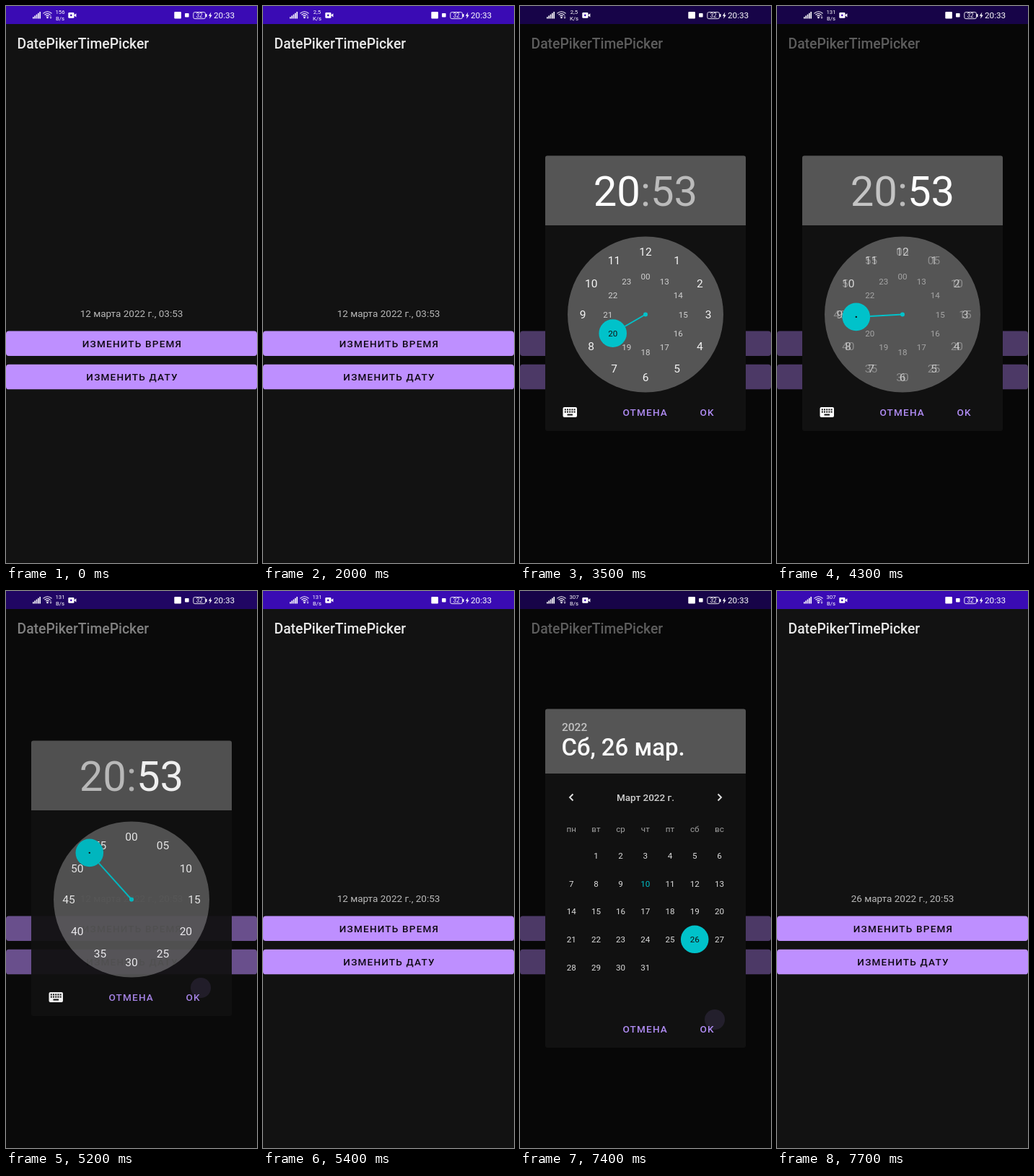
Recreate the animation shown at these times as an HTML page. Size 348 by 772 pixels, loop 8800 ms.

```html
<!DOCTYPE html>
<html lang="ru">
<head>
<meta charset="utf-8">
<style>
html, body { margin: 0; width: 100%; height: 100%; overflow: hidden; background: #121212; }
svg { display: block; width: 100%; height: 100%; font-family: Roboto, "Noto Sans", sans-serif; }
.mid { text-anchor: middle; }
.btn { font-size: 13.53px; font-weight: 500; letter-spacing: .0893em; }
</style>
</head>
<body>
<svg id="stage" viewBox="0 0 348 772"></svg>
<script>
const LOOP = 8800, STEP = 100;
const TEAL = '#00c2ca', PURPLE = '#be8fff', ACTION = '#b08cf4';
const HEADER = '#555', BODY = '#111';
const DIAL = { x: 174, y: 427.5, outer: 87, inner: 52.3, knob: 19.3 };
const stage = document.getElementById('stage');

function add(parent, tag, attrs, content) {
  const el = document.createElementNS('http://www.w3.org/2000/svg', tag);
  for (const key in attrs) el.setAttribute(key, attrs[key]);
  if (content !== undefined) el.textContent = content;
  parent.appendChild(el);
  return el;
}
const set = (el, attrs) => { for (const key in attrs) el.setAttribute(key, attrs[key]); };
const group = (parent, attrs) => add(parent, 'g', attrs);
const rect = (parent, x, y, width, height, fill, rx = 0) =>
  add(parent, 'rect', { x, y, width, height, fill, rx });
const circle = (parent, cx, cy, r, fill) => add(parent, 'circle', { cx, cy, r, fill });
const path = (parent, d, attrs) => add(parent, 'path', { d, fill: 'none', ...attrs });
const text = (parent, x, y, size, fill, content, attrs) =>
  add(parent, 'text', { x, y, 'font-size': size, fill, ...attrs }, content);
const centered = (parent, x, y, size, fill, content, attrs) =>
  text(parent, x, y + size * .355, size, fill, content, { class: 'mid', ...attrs });

const clamp = v => Math.min(1, Math.max(0, v));
const fade = (t, start, end) => t < end ? clamp((t - start) / 200) : 1 - clamp((t - end) / 200);
const decelerate = p => 1 - (1 - p) ** 2;
const smooth = p => (1 - Math.cos(Math.PI * p)) / 2;
const polar = (degrees, r) => {
  const a = degrees * Math.PI / 180;
  return [DIAL.x + r * Math.sin(a), DIAL.y - r * Math.cos(a)];
};
const pad = n => String(n).padStart(2, '0');

// Main screen
rect(stage, 0, 0, 348, 772, '#121212');
rect(stage, 0, 0, 348, 25, '#3a0bb4');
text(stage, 15.5, 59.3, 19.33, '#e9e9e9', 'DatePikerTimePicker', { 'font-weight': 500 });
const dateLine = text(stage, 174, 431.2, 13.53, '#b8b8b8', '', { class: 'mid' });

function wideButton(y, label) {
  rect(stage, 0, y, 348, 34.5, PURPLE, 3.9);
  const press = rect(stage, 0, y, 348, 34.5, '#000', 3.9);
  text(stage, 175, y + 22.6, 13.53, '#0d0812', label, { class: 'btn mid' });
  return press;
}
const timePress = wideButton(450.5, 'ИЗМЕНИТЬ ВРЕМЯ');
const datePress = wideButton(496.8, 'ИЗМЕНИТЬ ДАТУ');
const shade = rect(stage, 0, 0, 348, 772, '#000');

// Dialog frame shared by both pickers
function dialog(top, split, bottom) {
  const g = group(stage);
  rect(g, 35, top, 278, bottom - top, BODY, 3);
  path(g, `M35 ${split}V${top + 3}q0-3 3-3H310q3 0 3 3V${split}z`, { fill: HEADER });
  const press = circle(g, 270, bottom - 39, 14, ACTION);
  text(g, 142.6, bottom - 21.2, 13.53, ACTION, 'ОТМЕНА', { class: 'btn' });
  text(g, 249.5, bottom - 21.2, 13.53, ACTION, 'OK', { class: 'btn' });
  return { g, press };
}

// Time picker
const timeDialog = dialog(207.5, 304, 589);
const clock = text(timeDialog.g, 174, 276.7, 58, '#bbb', undefined, { class: 'mid' });
const hourText = add(clock, 'tspan', {});
add(clock, 'tspan', {}, ':');
const minuteText = add(clock, 'tspan', {}, '53');

circle(timeDialog.g, DIAL.x, DIAL.y, 108, HEADER);
const hours = group(timeDialog.g), minutes = group(timeDialog.g);
for (let i = 0; i < 12; i++) {
  const [x, y] = polar(i * 30, DIAL.outer);
  const [ix, iy] = polar(i * 30, DIAL.inner);
  centered(hours, x, y, 15.5, '#f4f4f4', i || 12);
  centered(hours, ix, iy, 11.6, '#d0d0d0', i ? i + 12 : '00');
  centered(minutes, x, y, 15.5, '#f4f4f4', pad(i * 5));
}
const hand = add(timeDialog.g, 'line', { x1: DIAL.x, y1: DIAL.y, stroke: TEAL, 'stroke-width': 2 });
circle(timeDialog.g, DIAL.x, DIAL.y, 3, TEAL);
const knob = circle(timeDialog.g, 0, 0, DIAL.knob, TEAL);
const knobDot = circle(timeDialog.g, 0, 0, 1.2, BODY);
const knobLabel = centered(timeDialog.g, 0, 0, 15.5, BODY, '');

rect(timeDialog.g, 59.5, 556, 19.5, 14, '#fff', 2);
for (let i = 0; i < 10; i++)
  rect(timeDialog.g, 61.8 + i % 5 * 3.2, 558.4 + Math.floor(i / 5) * 3.2, 2, 2, BODY);
rect(timeDialog.g, 65.5, 565.5, 7.5, 2, BODY);

// Date picker
const dateDialog = dialog(163.5, 253, 633);
const cal = dateDialog.g;
text(cal, 58, 193.5, 15.5, '#c2c2c2', '2022', { 'font-weight': 500 });
const dateTitle = text(cal, 57.5, 228.3, 32.9, '#fafafa', '', { 'font-weight': 500 });
centered(cal, 174, 286, 13.53, '#d0d0d0', 'Март 2022 г.', { 'font-weight': 500 });
for (const d of ['M73.5 281.5l-4.5 4.5 4.5 4.5', 'M274.5 281.5l4.5 4.5-4.5 4.5'])
  path(cal, d, { stroke: '#e0e0e0', 'stroke-width': 1.9 });
const columnX = c => 71.2 + c * 34.2;
const cell = day => [columnX(day % 7), 367 + Math.floor(day / 7) * 38.6];
['пн', 'вт', 'ср', 'чт', 'пт', 'сб', 'вс'].forEach((name, c) =>
  centered(cal, columnX(c), 330, 11.6, '#a0a0a0', name));
const dayMark = circle(cal, 0, 0, DIAL.knob, TEAL);
const days = [];
for (let day = 1; day <= 31; day++)
  days[day] = centered(cal, ...cell(day), 11.6, '#dcdcdc', day);

// Status icons stay above the shade
const status = group(stage, { fill: '#fff' });
for (let i = 0; i < 5; i++) rect(status, 37 + i * 2.35, 15.2 - i * 1.8, 1.6, 2.3 + i * 1.8, '#fff');
for (const r of [7.5, 5, 2.6])
  path(status, `M${57.5 - r * .8} ${16 - r * .75}Q57.5 ${16 - r * 1.45} ${57.5 + r * .8} ${16 - r * .75}`,
    { stroke: '#fff', 'stroke-width': 1.2 });
circle(status, 57.5, 16, 1.3, '#fff');
path(status, 'M62 13v4m-1.3-1.3l1.3 1.5 1.3-1.5', { stroke: '#fff', 'stroke-width': .7 });
const speed = text(status, 75, 11.3, 7.8, '#fff', '', { class: 'mid' });
const unit = text(status, 75, 19.8, 7.8, '#fff', '', { class: 'mid' });
rect(status, 86.3, 9, 8.2, 7.8, '#fff', 1.4);
path(status, 'M94 12.8l3.4-2.6v5.4z', { fill: '#fff' });
circle(status, 90.3, 12.9, 1.3, '#3a0bb4');
rect(status, 233.3, 8, 9.6, 9.6, '#fff', 1);
rect(status, 248, 10, 5.6, 5.6, '#fff', 1);
add(status, 'rect', { x: 259.8, y: 8.6, width: 16.6, height: 9, rx: 2, fill: 'none', stroke: '#fff', 'stroke-width': .9 });
rect(status, 277, 11, 1.5, 4.2, '#fff', .5);
centered(status, 268, 13.2, 8.2, '#fff', '32');
path(status, 'M284.3 8.6l-3.5 5.2h2.1l-.8 4 3.6-5.4h-2.2z', { fill: '#fff' });
text(status, 288, 17.2, 11.7, '#fff', '20:33');

const speeds = [[0, '156', 'B/s'], [100, '184', 'B/s'], [1100, '2,5', 'K/s'], [4100, '131', 'B/s'], [7100, '307', 'B/s']];
const during = (t, start, end, opacity) => t >= start && t < end ? opacity : 0;

function drawTimePicker(t, shown) {
  const evening = t >= 3500, editMinutes = t >= 4100;
  const turn = smooth(clamp((t - 4100) / 500));
  const angle = evening ? 240 + 78 * turn : 90;
  const reach = evening ? DIAL.inner + (DIAL.outer - DIAL.inner) * turn : DIAL.outer;
  const [x, y] = polar(angle, reach);
  const [x2, y2] = polar(angle, reach - DIAL.knob);

  set(timeDialog.g, { opacity: decelerate(shown) });
  set(timeDialog.press, { opacity: during(t, 5000, 5400, .12) });
  hourText.textContent = evening ? '20' : '03';
  set(hourText, { fill: editMinutes ? '#c4c4c4' : '#fff' });
  set(minuteText, { fill: editMinutes ? '#fff' : '#bbb' });
  set(hours, { opacity: 1 - turn });
  set(minutes, { opacity: turn });
  set(hand, { x2, y2 });
  set(knob, { cx: x, cy: y });
  set(knobDot, { cx: x, cy: y, opacity: turn > 0 ? 1 : 0 });
  const size = evening ? 11.6 : 15.5;
  knobLabel.textContent = evening ? '20' : '3';
  set(knobLabel, { x, y: y + size * .355, 'font-size': size, opacity: turn > 0 ? 0 : 1 });
}

function drawDatePicker(t, shown) {
  const selected = t >= 6900 ? 26 : 12;
  const [cx, cy] = cell(selected);
  const tint = clamp(shown * 1.15);
  set(cal, { opacity: decelerate(shown) });
  set(dateDialog.press, { opacity: during(t, 7300, 7700, .12) });
  dateTitle.textContent = `Сб, ${selected} мар.`;
  set(dayMark, { cx, cy, opacity: tint });
  for (const day of [12, 26]) set(days[day], { fill: day === selected ? BODY : '#dcdcdc' });
  set(days[10], { fill: TEAL, opacity: clamp(tint + .15) });
}

function draw(t) {
  const timeShown = fade(t, 2558, 5150);
  const dateShown = fade(t, 6306, 7450);
  const [, amount, per] = speeds.filter(([from]) => t >= from).pop();
  speed.textContent = amount;
  unit.textContent = per;
  dateLine.textContent = `${t >= 7400 ? 26 : 12} марта 2022 г., ${t >= 5150 ? 20 : '03'}:53`;
  set(timePress, { opacity: during(t, 2200, 2600, .1) });
  set(datePress, { opacity: during(t, 6100, 6400, .1) });
  set(shade, { opacity: .6 * Math.max(timeShown, dateShown) });
  drawTimePicker(t, timeShown);
  drawDatePicker(t, dateShown);
}

const began = performance.now();
function tick() {
  const t = Math.max(0, performance.now() - began) % LOOP;
  draw(Math.floor(t / STEP) * STEP);
  requestAnimationFrame(tick);
}
tick();
</script>
</body>
</html>
```
